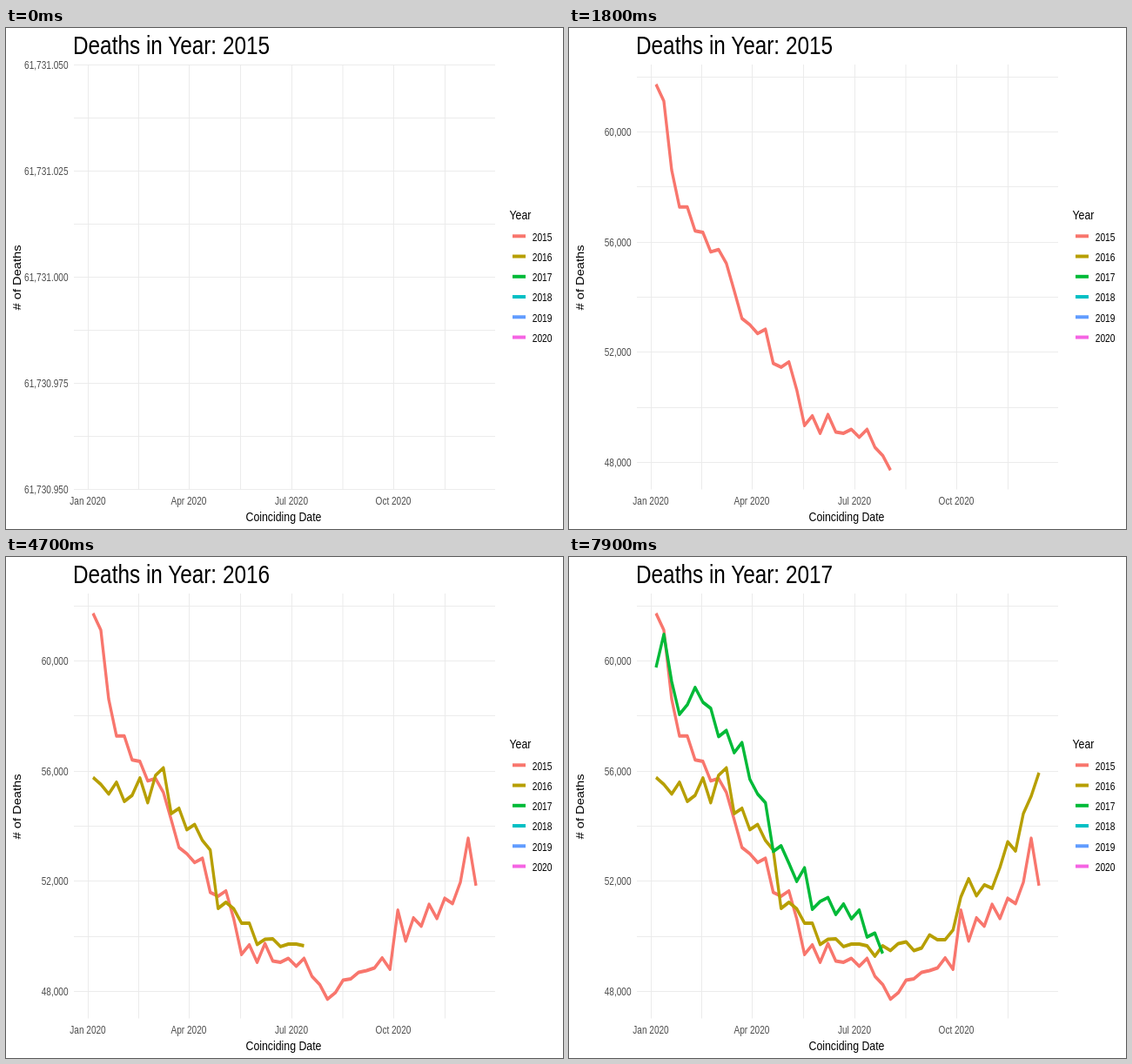
An HTML page that plays this animation: 640 px wide and 576 px high, repeating every 8 s.

```html
<!DOCTYPE html>
<html lang="en">
<head>
<meta charset="utf-8">
<title>Deaths by year</title>
<style>
  html, body { margin: 0; width: 100%; height: 100%; overflow: hidden; background: #fff; }
  svg { display: block; width: 640px; height: 576px; }
  text { font-family: "Liberation Sans", Arial, sans-serif; font-size: 14.67px; fill: #000; }
  .title { font-size: 29px; }
  .tick { font-size: 12px; fill: #4d4d4d; }
  .key { font-size: 12.2px; }
  .grid { stroke: #ebebeb; stroke-width: 1.15; fill: none; }
  .line { fill: none; stroke-width: 4; stroke-linejoin: round; }
</style>
</head>
<body>
<!-- The chart is laid out 762 wide and squeezed to the stage width. -->
<svg viewBox="0 0 762 576" preserveAspectRatio="none">
  <g id="fixed"></g>
  <g id="axis"></g>
  <g id="lines"></g>
</svg>
<script>
const LOOP = 8000, STEP = 100, PER_STEP = 1.628, WEEKS = 50;
const SQUEEZE = 640 / 762;
const PANEL = { left: 78, right: 562, top: 42.5, bottom: 530.5 };
const COLORS = ['#F8766D', '#B79F00', '#00BA38', '#00BFC4', '#619CFF', '#F564E3'];

const deaths = [
  [61731, 61120, 58620, 57275, 57275, 56410, 56350, 55645, 55730, 55230,
   54238, 53225, 53000, 52680, 52835, 51595, 51460, 51650, 50640, 49342,
   49690, 49058, 49737, 49105, 49058, 49200, 48916, 49200, 48553, 48253,
   47720, 47952, 48410, 48457, 48695, 48758, 48850, 49216, 48805, 50950,
   49830, 50670, 50370, 51160, 50650, 51380, 51190, 51960, 53560, 51837],
  [55769, 55516, 55169, 55595, 54900, 55121, 55753, 54853, 55848, 56116,
   54458, 54648, 53874, 54063, 53479, 53132, 51016, 51237, 51000, 50479,
   50479, 49706, 49895, 49911, 49627, 49721, 49721, 49658, 49279, 49658,
   49484, 49737, 49800, 49484, 49579, 50053, 49879, 49879, 50226, 51426,
   52090, 51474, 51868, 51742, 52500, 53431, 53100, 54458, 55090, 55942],
  [59764, 60964, 59258, 58058, 58406, 59037, 58500, 58279, 57253, 57474,
   56669, 57032, 55706, 55169, 54853, 53084, 53289, 52658, 51995, 52484,
   50984, 51268, 51410, 50795, 51174, 50637, 50953, 49974, 50116, 49374]
];

const byId = id => document.getElementById(id);
const fixed = byId('fixed'), axis = byId('axis'), lines = byId('lines');

function add(parent, tag, attrs, content = '') {
  const el = document.createElementNS('http://www.w3.org/2000/svg', tag);
  for (const name in attrs) el.setAttribute(name, attrs[name]);
  el.textContent = content;
  return parent.appendChild(el);
}

function label(parent, x, y, str, cls = '', anchor = 'start') {
  return add(parent, 'text', { x: x / SQUEEZE, y, class: cls, 'text-anchor': anchor }, str);
}

function segment(parent, x1, y1, x2, y2, attrs) {
  return add(parent, 'line', { x1: x1 / SQUEEZE, y1, x2: x2 / SQUEEZE, y2, ...attrs });
}

const title = label(fixed, 77, 30, '', 'title');
const GRID = { class: 'grid' };
[94.5, 152.5, 210.5, 269.5, 328.5, 387, 445.5, 504.5].forEach((x, i) => {
  segment(fixed, x, PANEL.top - 0.5, x, PANEL.bottom, GRID);
  if (i % 2 === 0) {
    label(fixed, x - 0.5, 548, ['Jan', 'Apr', 'Jul', 'Oct'][i / 2] + ' 2020', 'tick', 'middle');
  }
});
label(fixed, 319, 567, 'Coinciding Date', '', 'middle');
add(fixed, 'text', {
  transform: `translate(${17 / SQUEEZE} 287) rotate(-90)`, 'text-anchor': 'middle'
}, '# of Deaths');

label(fixed, 578.5, 220, 'Year');
COLORS.forEach((stroke, i) => {
  const y = 239.3 + 23.25 * i;
  segment(fixed, 582, y, 597, y, { stroke, 'stroke-width': 4 });
  label(fixed, 604.7, y + 5.4, 2015 + i, 'key');
});

const curves = deaths.map((_, i) => add(lines, 'polyline', { class: 'line', stroke: COLORS[i] }));

// Tick spacing by Wilkinson's extended scoring: simplicity, coverage, density.
function tickStep(lo, hi) {
  const span = hi - lo, power = Math.floor(Math.log10(span));
  let best = -Infinity, found = span;
  [1, 5, 2, 2.5, 4, 3].forEach((q, i) => {
    for (let z = power - 2; z <= power; z++) {
      const step = q * 10 ** z;
      for (let k = 2; k <= 12; k++) {
        const first = Math.floor(lo / step) - 1, last = Math.ceil(hi / step) + 1;
        for (let s = first; s + k - 1 <= last; s++) {
          const a = s * step, b = a + (k - 1) * step;
          const cover = 1 - 0.5 * ((hi - b) ** 2 + (lo - a) ** 2) / (0.1 * span) ** 2;
          const ratio = (k - 1) / (b - a) * (Math.max(b, hi) - Math.min(a, lo)) / 4;
          const density = 2 - Math.max(ratio, 1 / ratio);
          const score = 0.25 * (1 - i / 5) + 0.2 * cover + 0.5 * density;
          if (score > best + 1e-9) { best = score; found = step; }
        }
      }
    }
  });
  return found;
}

function draw(frame) {
  const head = Math.floor((frame + 0.5) * PER_STEP);
  const shown = deaths.map((d, i) => d.slice(0, Math.max(0, head + 1 - i * WEEKS)));
  const all = shown.flat();
  const min = Math.min(...all), max = Math.max(...all);
  const single = min === max;
  const pad = single ? 0.05 : (max - min) * 0.05;
  const lo = min - pad, hi = max + pad;
  const step = single ? 0.025 : tickStep(min, max);
  const yOf = v => PANEL.top + (hi - v) / (hi - lo) * (PANEL.bottom - PANEL.top);

  title.textContent = 'Deaths in Year: ' + (2015 + Math.floor(head / WEEKS));

  axis.replaceChildren();
  const half = step / 2, slack = half * 1e-3;
  const digits = single ? 3 : 0;
  for (let n = Math.ceil((lo - slack) / half); n * half <= hi + slack; n++) {
    const y = Math.floor(yOf(n * half) + 0.01) + 0.5;
    segment(axis, PANEL.left, y, PANEL.right, y, { class: 'grid', style: 'stroke-width:1' });
    if (n % 2 === 0) {
      const str = (n * half).toLocaleString('en-US', {
        minimumFractionDigits: digits, maximumFractionDigits: digits
      });
      label(axis, 71.5, y + 5, str, 'tick', 'end');
    }
  }

  shown.forEach((d, i) => {
    const points = d.map((v, w) => `${(100 + 8.98 * w) / SQUEEZE},${yOf(v).toFixed(2)}`);
    curves[i].setAttribute('points', points.length > 1 ? points.join(' ') : '');
  });
}

const start = performance.now();
let current = -1;
function tick() {
  const frame = Math.floor((performance.now() - start) % LOOP / STEP);
  if (frame !== current) draw(current = frame);
  requestAnimationFrame(tick);
}
tick();
</script>
</body>
</html>
```
